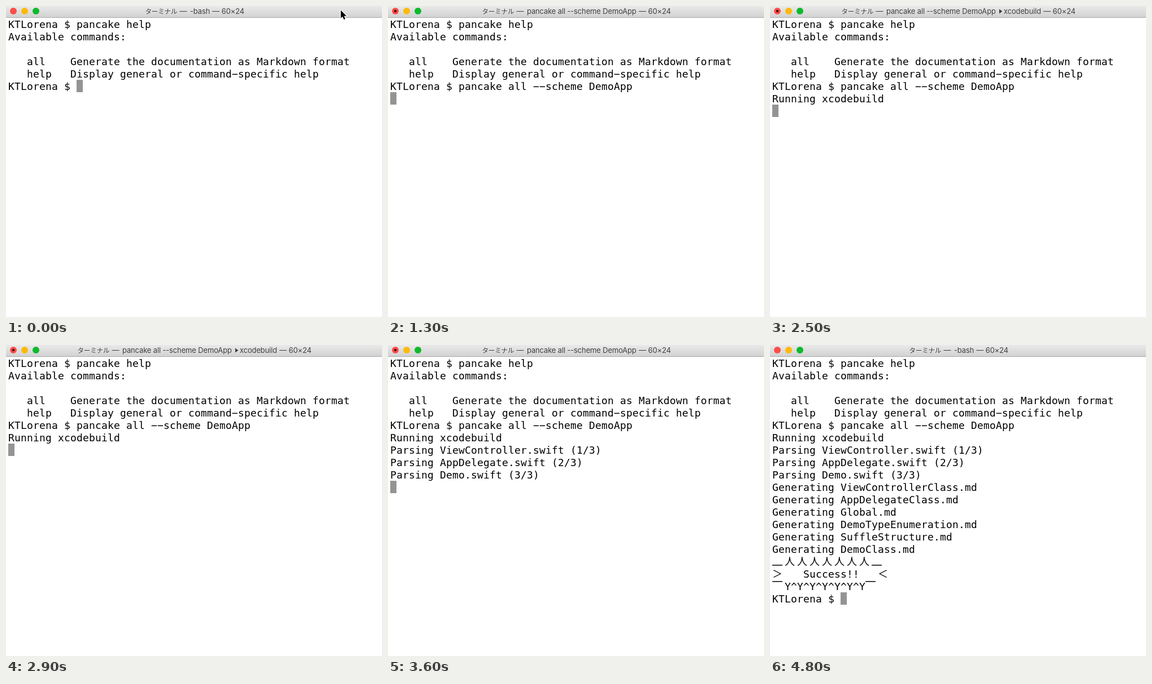
Recreate the animation shown at these times as an HTML page with a canvas. Size 666x552 px, loop 4900 ms.

```html
<!DOCTYPE html>
<html lang="en">
<head>
<meta charset="utf-8">
<title>Terminal</title>
<style>
html, body { margin: 0; width: 100%; height: 100%; overflow: hidden; background: #fff; }
canvas { display: block; }
</style>
</head>
<body>
<canvas id="stage" width="666" height="552"></canvas>
<script>
const ctx = document.getElementById("stage").getContext("2d");
const LOOP = 4900;
const CELL = { w: 11, h: 22, left: 4, top: 21, base: 18 };
const MONO = '18px "DejaVu Sans Mono", monospace';
const WIDE = '18px "Noto Sans CJK JP", "Noto Sans CJK", sans-serif';
const UI = '13px Inter, sans-serif';
const KANA = '11.5px "Noto Sans CJK JP", "Noto Sans CJK", sans-serif';

const PROMPT = "KTLorena $ ";
const COMMAND = "pancake all --scheme DemoApp";
const HELP = [
  PROMPT + "pancake help",
  "Available commands:",
  "",
  "   all    Generate the documentation as Markdown format",
  "   help   Display general or command-specific help"
];
const PARSED = ["ViewController", "AppDelegate", "Demo"]
  .map((name, i) => `Parsing ${name}.swift (${i + 1}/3)`);
const MADE = ["ViewControllerClass", "AppDelegateClass", "Global",
  "DemoTypeEnumeration", "SuffleStructure", "DemoClass"]
  .map(name => `Generating ${name}.md`);
const BANNER = [
  "＿" + "人".repeat(7) + "＿",
  "＞   Success!!   ＜",
  "￣Y^Y^Y^Y^Y^Y^Y￣"
];

// Output lines and the moment each one is printed
const OUTPUT = [
  [1400, "Running xcodebuild"],
  [3200, PARSED[0]],
  [3400, PARSED[1]],
  [3600, PARSED[2]],
  ...[...MADE, ...BANNER].map(line => [3700, line])
];
const TYPED = 500, ENTER = 1300, DONE = 3700;

function rect(x, y, w, h, color) {
  ctx.fillStyle = color;
  ctx.fillRect(x, y, w, h);
}

function disc(x, y, r, color) {
  ctx.fillStyle = color;
  ctx.beginPath();
  ctx.arc(x, y, r, 0, Math.PI * 2);
  ctx.fill();
}

function label(text, x, font, align = "left") {
  ctx.font = font;
  ctx.textAlign = align;
  ctx.fillText(text, x, 14);
}

// Draws one row on the character grid and returns the column after it
function drawRow(text, row) {
  const top = CELL.top + row * CELL.h;
  let col = 0;
  ctx.textAlign = "left";
  ctx.fillStyle = "#000";
  for (const ch of text) {
    const x = CELL.left + col * CELL.w;
    const wide = ch > "\u2fff";
    if (ch === "＿") ctx.fillRect(x, top + 17, 18, 1.5);
    else if (ch === "￣") ctx.fillRect(x, top + 2, 18, 1.5);
    else if (ch !== " ") {
      ctx.font = wide ? WIDE : MONO;
      // the terminal's hyphen is as long as a minus sign
      ctx.fillText(ch === "-" ? "\u2212" : ch, x, top + CELL.base);
    }
    col += wide ? 2 : 1;
  }
  return col;
}

function drawTitle(t) {
  const busy = t >= ENTER && t < DONE;
  const building = t >= 1400 && t < 3200;
  const [left, right] = !busy ? [246.5, 422] : building ? [126.5, 541] : [166.5, 501];
  const body = left + 79.5;

  const shade = ctx.createLinearGradient(0, 0, 0, 20);
  shade.addColorStop(0, "#e9e9e9");
  shade.addColorStop(1, "#d2d2d2");
  rect(0, 0, 666, 20, shade);
  rect(0, 20, 666, 1, "#a9a9a9");

  ["#fc4e48", "#fdb90c", "#0dba2c"].forEach((color, i) => disc(13 + 20 * i, 9, 6, color));
  if (busy) disc(13, 9, 2.2, "#4d0000");

  ctx.fillStyle = "#404040";
  ctx.letterSpacing = "-0.15px";
  label("ターミナル", left, KANA);
  label("—", left + 61, UI);
  label(busy ? COMMAND : "-bash", body, UI);
  label("60×24", right, UI, "right");
  label("—", right - 44, UI, "right");
  if (building) {
    label("xcodebuild", body + 208, UI);
    ctx.beginPath();
    ctx.moveTo(body + 200, 5.5);
    ctx.lineTo(body + 205.5, 9.5);
    ctx.lineTo(body + 200, 13.5);
    ctx.fill();
  }
  ctx.letterSpacing = "0px";
}

function drawPointer(x, y) {
  const path = new Path2D("M0 0V14.2L3.2 11.2L5.6 16.4L8 15.4L5.7 10.3H10Z");
  ctx.save();
  ctx.translate(x, y);
  ctx.lineJoin = "round";
  ctx.lineWidth = 2;
  ctx.strokeStyle = "#fff";
  ctx.stroke(path);
  ctx.fillStyle = "#000";
  ctx.fill(path);
  ctx.restore();
}

function screenAt(t) {
  const lines = [...HELP, PROMPT + (t >= TYPED ? COMMAND : "")];
  if (t >= ENTER) {
    for (const [at, line] of OUTPUT) if (t >= at) lines.push(line);
    lines.push(t >= DONE ? PROMPT : "");
  }
  return lines;
}

function draw(t) {
  rect(0, 0, 666, 552, "#fff");
  drawTitle(t);
  const lines = screenAt(t);
  let col = 0;
  lines.forEach((line, row) => { col = drawRow(line, row); });
  rect(CELL.left + col * CELL.w, CELL.top + (lines.length - 1) * CELL.h,
    CELL.w, CELL.h, "#949494");
  if (t < TYPED) drawPointer(593, 7.5);
}

let start;
function tick(now) {
  start ??= now;
  draw((now - start) % LOOP);
  requestAnimationFrame(tick);
}
draw(0);
requestAnimationFrame(tick);
</script>
</body>
</html>
```
